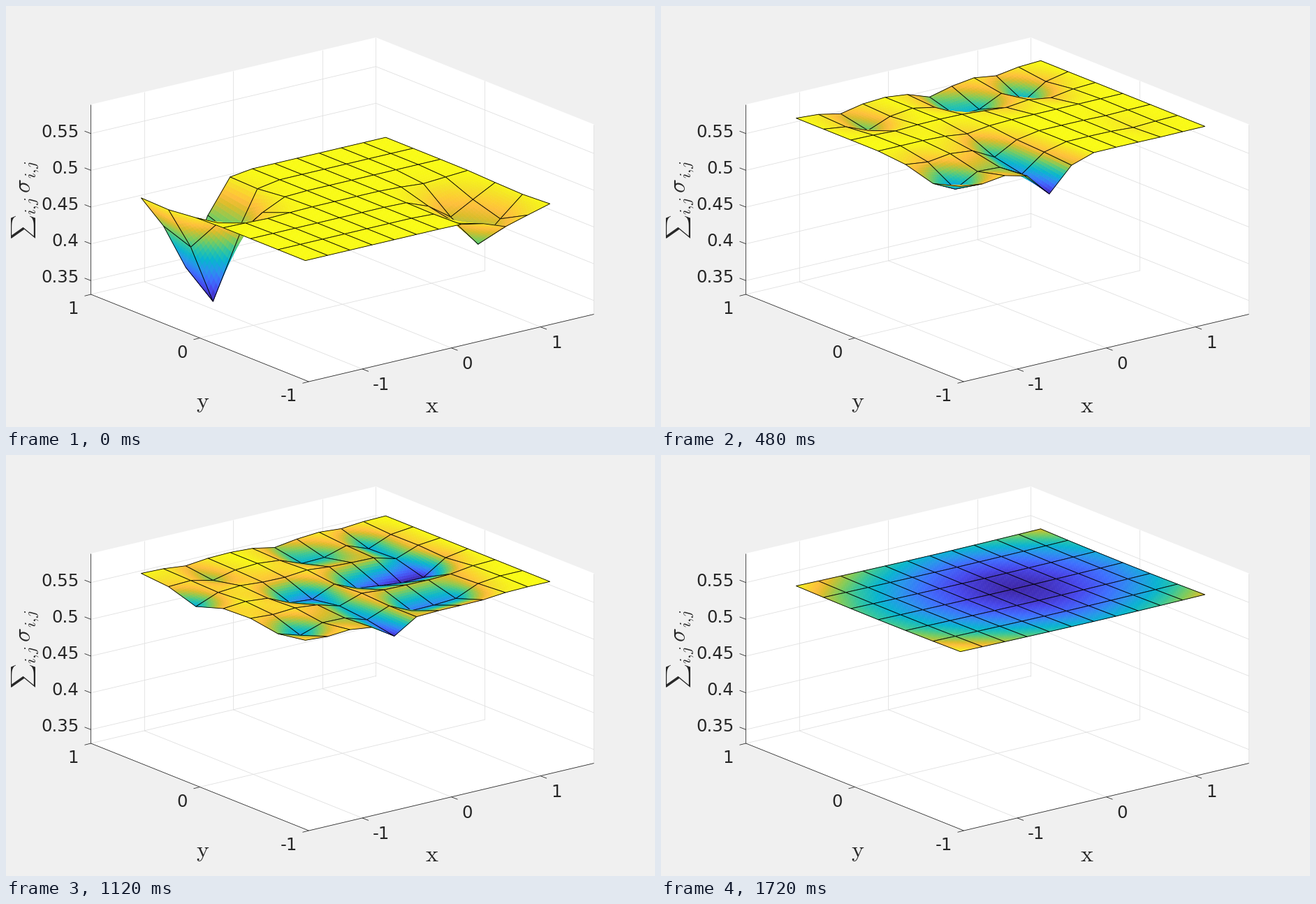
Recreate the animation shown at these times as a matplotlib script. Size 929 by 603 pixels, loop 1.88 s.

```python
import numpy as np
import matplotlib.pyplot as plt
from matplotlib.animation import FuncAnimation
from matplotlib.collections import LineCollection, PolyCollection
from matplotlib.colors import LinearSegmentedColormap

W, H, DPI = 929, 603, 64
PT = 72 / DPI                      # points per pixel
TICK, LOOP = 40, 1880              # ms
NX, NY, SUB = 12, 7, 10
INK, GRID = "#262626", "#dfdfdf"

plt.rcParams["font.family"] = "DejaVu Sans"
plt.rcParams["mathtext.fontset"] = "cm"

parula = LinearSegmentedColormap.from_list("surface", [
    (0, (.2422, .1504, .6603)), (1 / 9, (.2803, .2782, .9221)),
    (2 / 9, (.2440, .4358, .9988)), (3 / 9, (.1540, .5902, .9218)),
    (4 / 9, (.0297, .7082, .8163)), (5 / 9, (.1938, .7758, .6251)),
    (6 / 9, (.5044, .7993, .3480)), (7 / 9, (.8634, .7406, .1596)),
    (.84, (.9970, .7440, .2368)), (8 / 9, (.9892, .8136, .1885)),
    (.945, (.9600, .8950, .1450)), (1, (.9769, .9839, .0805))], N=512)

# start time in ms -> phase of the motion, held until the next start
steps = {0: 0, 120: .7, 280: 1, 400: 1.4, 480: 1.8, 640: 2, 720: 2.3,
         880: 3, 1000: 3.5, 1120: 4, 1200: 4.3, 1280: 4.65, 1400: 5,
         1560: 5.75, 1720: 6}

# wells as (i, j, depth), grouped by the phase in which they are fully open
first = [(2, .65, 168), (9.1, 4.8, 62)]
later = {
    1: [(2, .75, 12), (6, .7, 20), (7, 1, 16), (9, 1, 19), (.75, 5, 23),
        (2.5, 5, 12), (4, 4, 15), (4, 5, 20), (4, 6, 30)],
    3: [(0, 2, 19), (3, 3, 20), (6, 5, 23), (7, 5, 22)],
    4: [(4, 3, 23), (6, 3, 22), (7, 3, 26), (8, 3, 30), (9, 3, 30),
        (9, 2, 16), (8, 5, 20)]}

I, J = np.meshgrid(np.arange(NX), np.arange(NY))
BOWL = 3 * (1 - .57 * (np.abs(I - 6.3) / 6.3) ** 1.6 - .43 * ((J - 3) / 3) ** 2)


def key(phase, *values):
    """Linear curve through one value per whole phase."""
    return np.interp(phase, np.arange(len(values)), values)


def relief(phase):
    """Depth of the sheet at each node, in pixels."""
    width = key(phase, 1.1, 1, .8)
    total = np.zeros(I.shape)

    def dig(wells, scale):
        for i, j, d in wells:
            r2 = (I - i) ** 2 + (J - j) ** 2
            total[:] = np.hypot(total, scale * d * np.exp(-r2 / width ** 2))

    dig(first, key(phase, 1, .2, 0))
    amp = key(phase, 0, 3.3, 1, 1.05, .85, .63, 0)
    for opened, wells in later.items():
        dig(wells, amp * np.clip(phase - opened + 1, 0, 1))
    return total + BOWL * np.clip(phase - 5, 0, 1)


def cells(a):
    """Corner values of every cell, ordered from back to front."""
    c = np.stack([a[:-1, :-1], a[:-1, 1:], a[1:, 1:], a[1:, :-1]], -1)
    return c[:, ::-1].reshape(-1, 4)


# bilinear weights of the corners of each patch inside a cell
u = np.arange(SUB) / SUB
S, T = (m.ravel()[:, None] for m in np.meshgrid(u, u))
S = S + np.array([0, 1, 1, 0]) / SUB
T = T + np.array([0, 0, 1, 1]) / SUB
WEIGHT = np.stack([(1 - S) * (1 - T), S * (1 - T), S * T, (1 - S) * T], -1)
WEIGHT = np.concatenate([WEIGHT, np.eye(4)[None]])   # last one: cell outline
MID = WEIGHT.mean(1)


def surface(phase):
    depth = relief(phase)
    top = key(phase, 270, 180.5, 155, 160, 169, 187, 187)
    x = 193 + 31.82 * I + 39.17 * J
    y = top - 7.486 * I + 15.69 * J + depth
    level = 1 - (depth - depth.min()) / np.ptp(depth)
    verts = np.stack([np.einsum("pvc,qc->qpv", WEIGHT, cells(a))
                      for a in (x, y)], -1)
    face = parula(np.einsum("pc,qc->qp", MID, cells(level)))
    edge = face.copy()
    face[:, -1] = 0
    edge[:, -1] = 0, 0, 0, 1
    return verts.reshape(-1, 4, 2), face.reshape(-1, 4), edge.reshape(-1, 4)


fig = plt.figure(figsize=(W / DPI, H / DPI), dpi=DPI, facecolor="#f0f0f0")
ax = fig.add_axes([0, 0, 1, 1])
ax.set_xlim(-.5, W - .5)
ax.set_ylim(H - .5, -.5)
ax.axis("off")

# axes box
left, front, right, back = map(np.array, (
    (121, 412.5), (433, 537.5), (841, 441), (529, 316.5)))
up = np.array((0, -272))
ax.add_patch(plt.Polygon([left, front, right, right + up, back + up, left + up],
                         fc="white", ec="none", zorder=0))


def label(x, y, s, px, **kw):
    kw = {"ha": "center", "va": "baseline", **kw}
    ax.text(x, y, s, fontsize=px * PT, color=INK, **kw)


def number(x, y, s, **kw):
    """Tick label with its digits centred on y."""
    label(x, y + 9, s, 24.4, **kw)


grid, ink = [], [(left + up, left), (left, front), (front, right)]

for v in (-1, 0, 1):
    p = front + (right - front) * (v + 1.6) / 3.2
    q = p + left - front
    grid += [(p, q), (q, q + up)]
    ink.append((p, p + (9, 3.5)))
    number(p[0] + (27 if v < 0 else 23), p[1] + 21.5, str(v))

    p = front + (left - front) * (v + 1) / 2
    q = p + right - front
    grid += [(p, q), (q, q + up)]
    ink.append((p, p + (-9, 2.3)))
    number(p[0] - (29 if v < 0 else 25), p[1] + 19, str(v))

for k in range(5):
    rise = np.array((0, -19.7 - 52.65 * k))
    grid += [(left + rise, back + rise), (back + rise, right + rise)]
    ink.append((left + rise, left + rise + (-9, -3.5)))
    number(104, 387 - 52.2 * k, f"{.35 + .05 * k:.2f}".rstrip("0"), ha="right")

for lines, color in ((grid, GRID), (ink, INK)):
    ax.add_collection(LineCollection(lines, colors=color,
                                     linewidths=.8 * PT, zorder=1))

label(609, 581, r"$\mathrm{x}$", 34)
label(281, 575, r"$\mathrm{y}$", 34)
for x, y, s, px in ((25, 316, r"$\sum$", 24), (37, 286, "$i{,}j$", 23),
                    (25, 257, r"$\sigma$", 33), (37, 234, "$i{,}j$", 23)):
    label(x, y, s, px, rotation=90, va="center")

patch_lw = [.6 * PT] * SUB ** 2 + [.85 * PT]
mesh = PolyCollection([], linewidths=patch_lw, joinstyle="round", zorder=2)
ax.add_collection(mesh, autolim=False)


def draw(n):
    phase = [p for start, p in steps.items() if start <= n * TICK][-1]
    verts, face, edge = surface(phase)
    mesh.set_verts(verts)
    mesh.set_facecolor(face)
    mesh.set_edgecolor(edge)
    return mesh,


anim = FuncAnimation(fig, draw, frames=LOOP // TICK, interval=TICK,
                     init_func=lambda: draw(0), repeat=True, repeat_delay=0)
plt.show()
```
